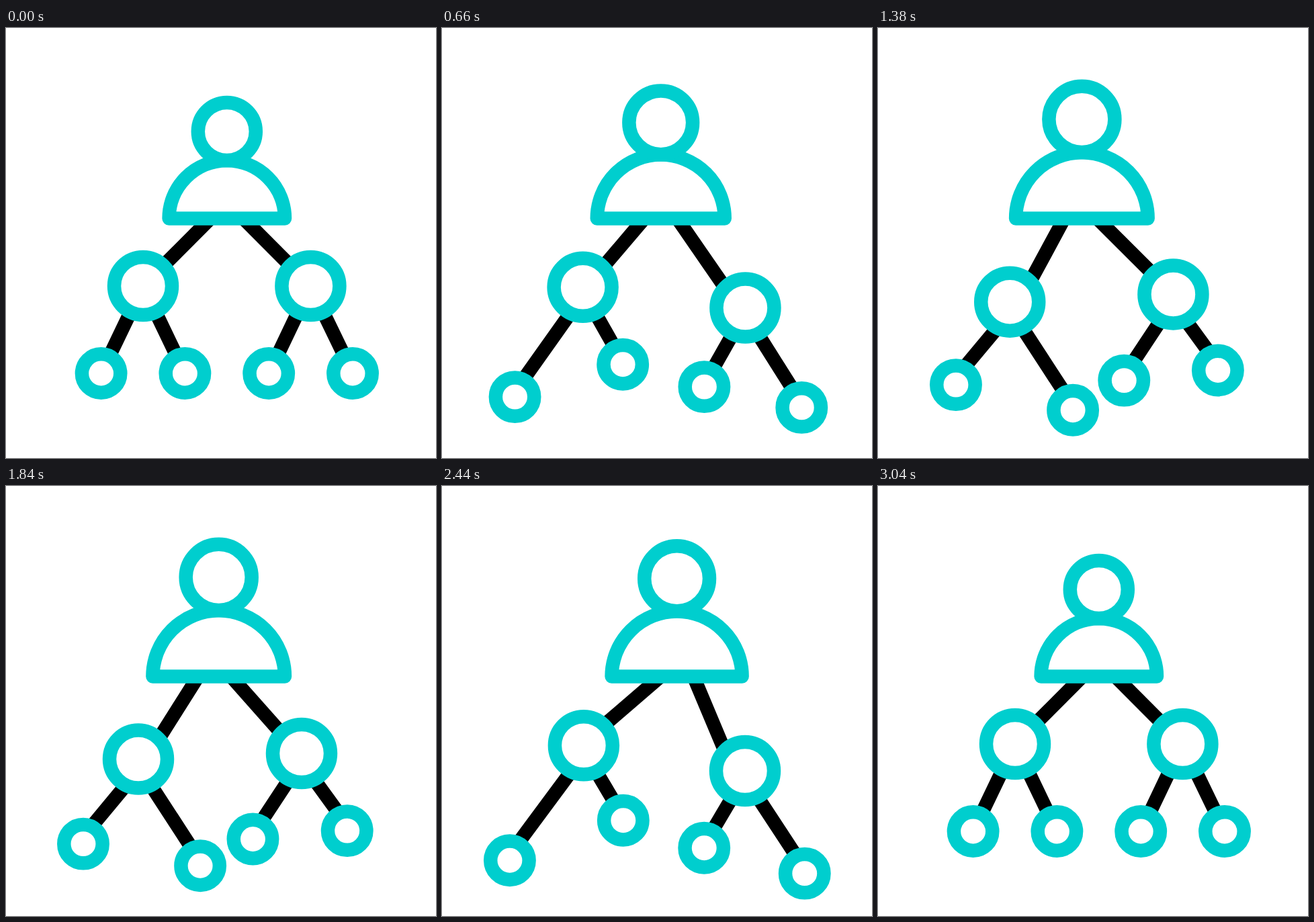
These frames come from a looping animation (640 px wide and 640 px high, 3.22 s). An HTML page:

```html
<!DOCTYPE html>
<html lang="en">
<head>
<meta charset="utf-8">
<title>Swaying hierarchy</title>
<style>
  html, body { margin: 0; width: 100%; height: 100%; overflow: hidden; background: #fff; }
  svg { display: block; width: 100vw; height: 100vh; }
  .link { stroke: #000; stroke-width: 20.5; }
  .ring { fill: #fff; stroke: #00cece; stroke-width: 20.5; stroke-linejoin: round; }
</style>
</head>
<body>
<svg id="stage" viewBox="0 0 640 640"></svg>
<script>
const LOOP = 3220, STEP = 20;
const BEATS = [200, 900, 1600, 2300, 3000];
const BODY_BEATS = [200, 900, 1575, 2255, 3000];
const BASE_Y = 283.5, CENTER_X = 328.8, BODY_R = 86.2, HEAD_R = 43, HEAD_RISE = 129.5;

// Each node: radius and its rest, right-lean and left-lean positions.
const nodes = {
  left:  { r: 43,   poses: [[204, 384],     [211.7, 386.5], [191.5, 414.1]] },
  right: { r: 43,   poses: [[453.4, 384],   [450.7, 428.7], [436, 386.5]] },
  a:     { r: 28.7, poses: [[141.6, 514],   [96.2, 562.2],  [122, 521.6]] },
  b:     { r: 28.7, poses: [[266.4, 514],   [270.2, 495.9], [296.2, 591.1]] },
  c:     { r: 28.7, poses: [[391.2, 514],   [390.1, 541.6], [359, 519.4]] },
  d:     { r: 28.7, poses: [[516, 514],     [542.5, 583.9], [494.7, 486.7]] }
};
const branches = [["left", "a", -1], ["left", "b", 1], ["right", "c", -1], ["right", "d", 1]];
const trunks = [["left", -1], ["right", 1]];

const stage = document.getElementById("stage");
function add(tag, className) {
  const el = document.createElementNS("http://www.w3.org/2000/svg", tag);
  el.setAttribute("class", className);
  return stage.appendChild(el);
}
function set(el, attrs) {
  for (const key in attrs) el.setAttribute(key, attrs[key]);
}

const trunkEls = trunks.map(() => add("line", "link"));
const branchEls = branches.map(() => add("line", "link"));
for (const node of Object.values(nodes)) {
  node.el = add("circle", "ring");
  set(node.el, { r: node.r });
}
const body = add("path", "ring");
const head = add("circle", "ring");

// Eased value at time t through values placed on the given beats.
function track(t, values, beats = BEATS) {
  if (t <= beats[0]) return values[0];
  for (let i = 1; i < beats.length; i++) {
    if (t < beats[i]) {
      const u = (t - beats[i - 1]) / (beats[i] - beats[i - 1]);
      return values[i - 1] + (values[i] - values[i - 1]) * u * u * (3 - 2 * u);
    }
  }
  return values[values.length - 1];
}

function connect(el, x1, y1, x2, y2) {
  set(el, { x1, y1, x2, y2 });
}

function render(t) {
  for (const node of Object.values(nodes)) {
    const [rest, lean, back] = node.poses;
    [node.x, node.y] = [0, 1].map(k => track(t, [rest[k], lean[k], back[k], lean[k], rest[k]]));
    set(node.el, { cx: node.x, cy: node.y });
  }

  // Links are pinned to fixed points on the rings.
  const trunkX = CENTER_X + track(t, [0, -4.3, -34, 23.5, 0]);
  trunks.forEach(([name, side], i) => {
    const n = nodes[name], reach = n.r * Math.SQRT1_2;
    connect(trunkEls[i], trunkX + side * 24.5, BASE_Y, n.x - side * reach, n.y - reach);
  });
  branches.forEach(([from, to, side], i) => {
    const p = nodes[from], q = nodes[to], sin = 0.433 * side, cos = 0.901;
    connect(branchEls[i], p.x + p.r * sin, p.y + p.r * cos, q.x - q.r * sin, q.y - q.r * cos);
  });

  const x = CENTER_X + track(t, [0, -4.2, -30.8, 24.6, 0], BODY_BEATS);
  const scale = track(t, [1, 1.14, 1.14, 1.14, 1]);
  const r = BODY_R * scale;
  set(body, { d: `M${x - r} ${BASE_Y}A${r} ${r} 0 0 1 ${x + r} ${BASE_Y}Z` });
  set(head, { cx: x, cy: BASE_Y - HEAD_RISE * scale, r: HEAD_R * scale });
}

const start = performance.now();
function tick() {
  const t = (performance.now() - start) % LOOP;
  render(Math.floor(t / STEP) * STEP);
  requestAnimationFrame(tick);
}
tick();
</script>
</body>
</html>
```
